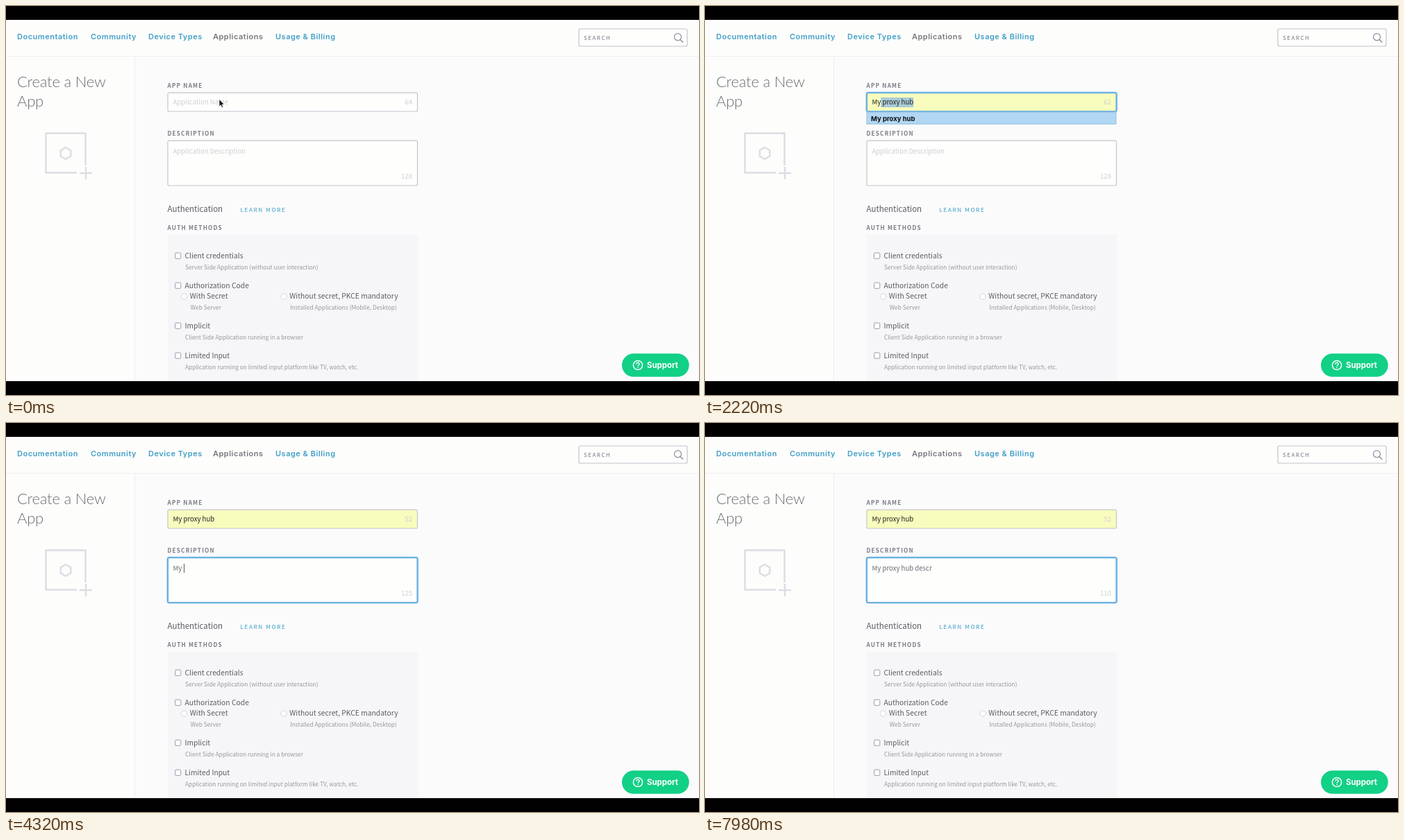
An HTML page for the animation above (8000 ms loop, 998x561 px).

```html
<!DOCTYPE html>
<html lang="en">
<head>
<meta charset="utf-8">
<title>Create a New App</title>
<style>
  html, body { margin: 0; width: 100%; height: 100%; overflow: hidden; background: #000; }
  svg { display: block; width: 100vw; height: 100vh; }
  text { font-family: "Noto Sans CJK JP", "Noto Sans CJK SC", "Noto Sans CJK", "Open Sans", sans-serif; white-space: pre; }
  .nav { font: 600 11px Inter, sans-serif; letter-spacing: .5px; fill: #429fc7; }
  .here { fill: #74777c; }
  .title { font: 300 22px Lato, sans-serif; letter-spacing: -.2px; fill: #6b6d72; }
  .label { font-size: 8.2px; font-weight: 700; letter-spacing: 1.2px; fill: #777a82; }
  .link { font-size: 8.2px; letter-spacing: 1.6px; fill: #3c9dc6; }
  .search { font-size: 8px; font-weight: 500; letter-spacing: 1.5px; fill: #73757e; }
  .section { font-size: 11.5px; fill: #5a5d63; }
  .option { font-size: 10.3px; fill: #5a5d63; }
  .hint { font-size: 8.35px; fill: #96989f; }
  .input, .count { font-size: 9.6px; }
  .count { fill: #cfd0d5; text-anchor: end; }
  .menu { font: 700 9.5px Inter, sans-serif; fill: #111; }
  .support { font: 700 11.4px Inter, sans-serif; fill: #fff; }
  .line { fill: none; stroke: #dddde4; stroke-width: 2.5; }
</style>
</head>
<body>
<svg id="stage" viewBox="0 0 998 561" preserveAspectRatio="none"></svg>
<script>
const LOOP = 8000;
const NAME = 'My proxy hub';
const stage = document.getElementById('stage');

function add(tag, attrs = {}, content = '') {
  const node = document.createElementNS('http://www.w3.org/2000/svg', tag);
  set(node, attrs);
  node.textContent = content;
  return stage.appendChild(node);
}
function set(node, attrs) {
  for (const key in attrs) node.setAttribute(key, attrs[key]);
}
const show = (node, on) => set(node, { visibility: on ? 'visible' : 'hidden' });
const rect = (x, y, width, height, attrs) => add('rect', { x, y, width, height, ...attrs });
const text = (x, y, style, content) => add('text', { x, y, class: style }, content);
const path = (d, attrs) => add('path', { d, ...attrs });

// Page background and header
rect(0, 20, 998, 521, { fill: '#fdfdfc' });
rect(186, 73, 812, 468, { fill: '#fbfbfc' });
path('M0 72.5H998M185.5 73V541', { stroke: '#eeeef1' });
[[16, 'Documentation'], [122, 'Community'], [205, 'Device Types'],
 [298, 'Applications'], [388, 'Usage & Billing']].forEach(([x, label]) =>
  text(x, 48.3, label === 'Applications' ? 'nav here' : 'nav', label));
rect(825, 33, 156, 25, { rx: 2, fill: '#fefefd', stroke: '#c3c4cc', 'stroke-width': 1.2 });
text(832, 48.8, 'search', 'SEARCH');
add('circle', { cx: 967.5, cy: 44.7, r: 5, fill: 'none', stroke: '#8b8d9c', 'stroke-width': 1.2 });
path('M971 48.4L975.2 52.6', { stroke: '#8b8d9c', 'stroke-width': 1.4 });

// Sidebar
text(16, 116.5, 'title', 'Create a New');
text(16, 144.5, 'title', 'App');
path('M102 240.5H57.5V183.5H114.5V230', { class: 'line', 'stroke-linejoin': 'round' });
path('M115 232V250M106 241H124', { class: 'line' });
path('M86 204L93.2 208.2V216.6L86 220.8L78.8 216.6V208.2Z', { class: 'line' });

// Authentication options
text(232.5, 297, 'section', 'Authentication');
text(337.5, 297, 'link', 'LEARN MORE');
text(232.5, 322.8, 'label', 'AUTH METHODS');
rect(233, 330, 360, 211, { fill: '#f6f6f9' });
[[360, 'Client credentials', 'Server Side Application (without user interaction)'],
 [403, 'Authorization Code', ''],
 [461, 'Implicit', 'Client Side Application running in a browser'],
 [504, 'Limited Input', 'Application running on limited input platform like TV, watch, etc.']
].forEach(([y, name, hint]) => {
  rect(243.5, y - 4, 8.3, 8.3, { rx: 1.5, fill: '#fff', stroke: '#9a9ca6' });
  text(257.5, y + 4, 'option', name);
  text(258, y + 19.8, 'hint', hint);
});
[[256.5, 'With Secret', 'Web Server'],
 [400, 'Without secret, PKCE mandatory', 'Installed Applications (Mobile, Desktop)']
].forEach(([x, name, hint]) => {
  add('circle', { cx: x, cy: 419, r: 4.2, fill: '#fefefe', stroke: '#d3d4d9' });
  text(x + 8.3, 422, 'option', name);
  text(x + 9.2, 437.6, 'hint', hint);
});

// Support button
rect(887, 501.3, 96.7, 33.5, { rx: 16.7, fill: '#12d086' });
add('circle', { cx: 910, cy: 518, r: 6.6, fill: 'none', stroke: '#fff', 'stroke-width': 1.5 });
path('M907.9 516.6C907.9 513.5 912.3 513.8 912.2 516.5C912.1 518 910 518 910 519.6M910 520.8V522.2',
  { fill: 'none', stroke: '#fff', 'stroke-width': 1.4 });
text(923, 522.4, 'support', 'Support');

// Text fields
function makeField(label, y, height, baseline, countBaseline, placeholder, limit) {
  text(232.5, y - 7.6, 'label', label);
  const ring = rect(233, y, 359.5, height,
    { rx: 2.5, fill: 'none', stroke: '#b4d8f4', 'stroke-width': 3.6 });
  const box = rect(233, y, 359.5, height, { rx: 2 });
  const selection = rect(0, baseline - 10.3, 0, 14, { fill: '#a9cbd6' });
  const value = text(240.5, baseline, 'input', '');
  const count = text(585, countBaseline, 'count', '');
  const caret = rect(0, baseline - 10, 1, 13, { fill: '#5c5c5c' });

  return ({ content, typed = content.length, focused, filled, caretOn }) => {
    show(ring, focused);
    set(box, {
      fill: filled ? '#f8fcbd' : '#fefefd',
      stroke: focused ? '#6cb2e2' : '#c5c6cd',
      'stroke-width': focused ? 2.2 : 1.2
    });
    value.textContent = content || placeholder;
    set(value, { fill: !content ? '#cdced3' : filled ? '#222' : '#6a6c72' });
    count.textContent = limit - typed;
    const widthOf = n => n ? value.getSubStringLength(0, n) : 0;
    const start = 240.5 + widthOf(typed);
    const selected = typed < content.length;
    set(selection, { x: start, width: selected ? 240.5 + widthOf(content.length) - start : 0 });
    set(caret, { x: Math.ceil(start) });
    show(caret, focused && caretOn && !selected);
  };
}
const drawName = makeField('APP NAME', 125.2, 26.8, 142.3, 142.3, 'Application Name', 64);
const drawDescription = makeField('DESCRIPTION', 194.2, 64.8, 213, 248.6, 'Application Description', 128);

const menu = rect(233, 153, 359, 17.2, { stroke: '#94bfdb' });
const menuText = text(239, 165.6, 'menu', NAME);
const pointer = path('M307 134.5V144.8L309.3 142.7L310.9 146.4L312.7 145.6L311.1 142H314.3Z',
  { fill: '#111', stroke: '#fff', 'stroke-width': .7 });

// Moments of the interaction, in ms
const CLICK = 500, PREVIEW = 2000, ACCEPT = 2560, NEXT_FIELD = 3000;
const nameKeys = [1150, 1450];
const descriptionKeys = Array.from({ length: 11 }, (_, i) => 3980 + i * 130)
  .concat([5520, 5760, 6000, 6240, 6480, 6950, 7400]);
const pressed = (keys, t) => keys.filter(k => k <= t);
const blink = (t, events) => (t - Math.max(...pressed(events, t), 0)) % 1000 < 500;

function draw(t) {
  const previewed = t >= PREVIEW, accepted = t >= ACCEPT, moved = t >= NEXT_FIELD;
  const nameTyped = pressed(nameKeys, t).length;
  const descTyped = pressed(descriptionKeys, t).length;
  drawName({
    content: previewed ? NAME : NAME.slice(0, nameTyped),
    typed: accepted ? NAME.length : nameTyped,
    focused: t >= CLICK && !moved,
    filled: previewed,
    caretOn: blink(t, [CLICK, ...nameKeys, ACCEPT])
  });
  drawDescription({
    content: (NAME + ' descr').slice(0, descTyped),
    focused: moved,
    filled: false,
    caretOn: blink(t, [NEXT_FIELD, ...descriptionKeys])
  });
  const open = nameTyped > 0 && !accepted;
  set(menu, { fill: previewed ? '#b1d7f5' : '#fefefe' });
  show(menu, open);
  show(menuText, open);
  show(pointer, nameTyped === 0);
}

const began = performance.now();
function tick() {
  draw((performance.now() - began) % LOOP);
  requestAnimationFrame(tick);
}
tick();
</script>
</body>
</html>
```
